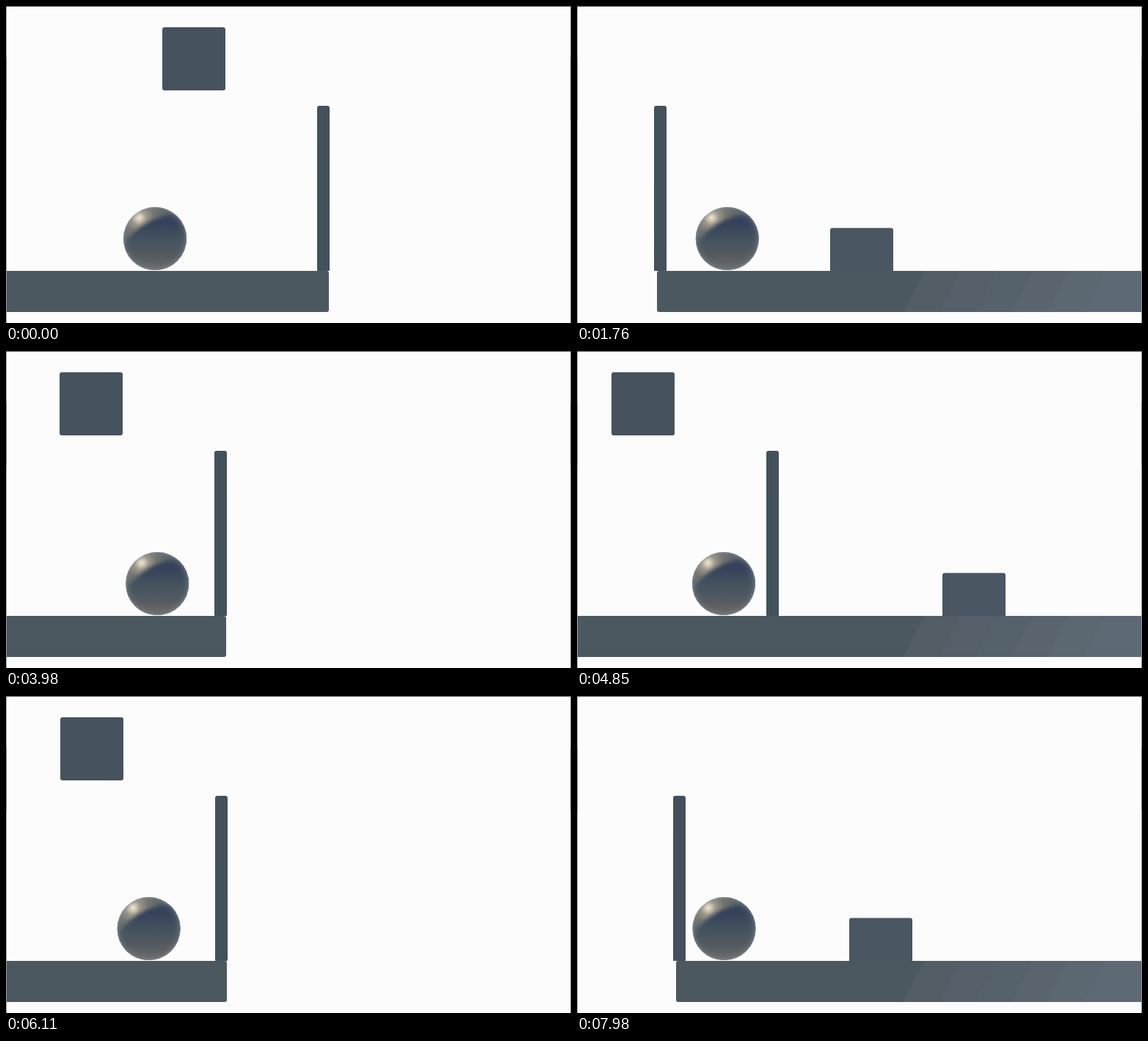
These frames come from a looping animation (770x432 px, 8 s). An HTML page with a canvas:

```html
<!DOCTYPE html>
<html lang="en">
<head>
<meta charset="utf-8">
<title>Rolling ball</title>
<style>
html, body { margin: 0; width: 100%; height: 100%; overflow: hidden; background: #fcfcfc; }
canvas { display: block; width: 100%; height: 100%; }
</style>
</head>
<body>
<canvas id="stage" width="770" height="432"></canvas>
<script>
const ctx = document.getElementById('stage').getContext('2d');
const LOOP = 8000, STEP = 10;
const FLOOR = 361, FLOOR_H = 56, SIZE = 86, RADIUS = 43;

// Key points of the wall on screen: time (ms), x
const path = [
  [500, 424], [1280, 183], [1760, 105], [2080, 86], [2920, 198], [3120, 261],
  [3560, 325], [4585, 213], [4850, 258], [5080, 290], [5780, 175], [6110, 285],
  [6260, 365], [6900, 123], [7320, 27], [7980, 131], [8400, 176]
];

const slope = i => (path[i + 1][1] - path[i][1]) / (path[i + 1][0] - path[i][0]);

// Harmonic mean of the neighbouring slopes, zero where the ball turns
function tangent(i) {
  if (i === 0 || i === path.length - 1) return 0;
  const a = slope(i - 1), b = slope(i);
  return a * b > 0 ? 2 * a * b / (a + b) : 0;
}

// Monotone cubic through the key points: position and speed (px/ms)
function motion(t) {
  if (t <= path[0][0]) return { x: path[0][1], v: 0 };
  const i = path.findIndex(p => p[0] > t) - 1;
  const [t0, x0] = path[i], d = path[i + 1][0] - t0, s = (t - t0) / d;
  const m = slope(i), a = tangent(i), b = tangent(i + 1);
  const c = 3 * m - 2 * a - b, e = a + b - 2 * m;
  return {
    x: x0 + d * s * (a + s * (c + s * e)),
    v: a + s * (2 * c + 3 * s * e)
  };
}

// A room unloads once the ball is well past the wall and loads on its return
const rooms = [];
for (let t = 0, left = true, right = false; t < LOOP; t += STEP) {
  const { x } = motion(t);
  left = left ? x > 112 : x > 145;
  right = right ? x < 279 : x < 245;
  rooms.push({ left, right });
}

function gradient(g, stops) {
  stops.forEach(([at, color]) => g.addColorStop(at, color));
  return g;
}

const wallFill = gradient(ctx.createLinearGradient(0, 136, 0, FLOOR),
  [[0, '#44515b'], [1, '#42515b']]);
const body = gradient(ctx.createLinearGradient(0, -RADIUS, 0, RADIUS), [
  [0, '#3f4a60'], [0.25, '#35415a'], [0.5, '#43525f'], [0.75, '#53595f'], [1, '#6b6b69']
]);
const shine = gradient(ctx.createRadialGradient(-22, -29, 0, -22, -29, 58), [
  [0, '#f8edd0'], [0.07, '#d8cfb8'], [0.18, '#9c978b'],
  [0.36, '#74756f'], [0.6, '#5b6468'], [1, '#4c5866']
]);
const rim = gradient(ctx.createRadialGradient(0, 0, 33, 0, 0, RADIUS), [
  [0, 'rgba(125,132,136,0)'], [0.6, 'rgba(125,132,136,.15)'], [1, 'rgba(140,150,160,.55)']
]);

function block(x, y, w, h, r, fill) {
  ctx.beginPath();
  ctx.roundRect(x, y, w, h, r);
  ctx.fillStyle = fill;
  ctx.fill();
}

function floor(from, to) {
  ctx.save();
  block(from, FLOOR, to - from, FLOOR_H, 3, '#4b5860');
  ctx.clip();
  // Slanted reflections, lighter to the right
  for (let i = 0; i < 6; i++) {
    const x = 445 + 49 * i;
    ctx.beginPath();
    ctx.moveTo(x, FLOOR + FLOOR_H);
    ctx.lineTo(x + 29, FLOOR);
    ctx.lineTo(800, FLOOR);
    ctx.lineTo(800, FLOOR + FLOOR_H);
    ctx.fillStyle = `rgb(${82 + 2.2 * i}, ${93 + 2.4 * i}, ${102 + 2.7 * i})`;
    ctx.fill();
  }
  ctx.restore();
}

function ball(x) {
  ctx.save();
  ctx.translate(x, 317);
  ctx.beginPath();
  ctx.arc(0, 0, RADIUS, 0, 7);
  ctx.clip();
  ctx.fillStyle = shine;
  ctx.fillRect(-44, -44, 88, 88);
  ctx.filter = 'blur(2.5px)';
  ctx.beginPath();
  ctx.moveTo(-44, 12);
  ctx.bezierCurveTo(-31, -12, -6, -29, 27, -34);
  ctx.lineTo(60, -20);
  ctx.lineTo(60, 60);
  ctx.lineTo(-50, 60);
  ctx.fillStyle = body;
  ctx.fill();
  ctx.filter = 'none';
  ctx.fillStyle = rim;
  ctx.fillRect(-44, -44, 88, 88);
  ctx.restore();
}

function border() {
  ctx.fillStyle = '#555';
  ctx.fillRect(0, 0, 770, 1);
  for (const x of [0, 769]) {
    ctx.fillStyle = '#999';
    ctx.fillRect(x, 1, 1, 431);
    ctx.fillStyle = '#777';
    ctx.fillRect(x, 70, 1, 86);
  }
}

function draw(t) {
  const { x, v } = motion(t), wall = Math.round(x);
  const { left, right } = rooms[Math.floor(t / STEP)];
  ctx.fillStyle = '#fcfcfc';
  ctx.fillRect(0, 0, 770, 432);
  // The camera trails the ball by 20 ms
  ball(203 - v * 20);
  if (left) block(wall - 211, 29, SIZE, SIZE, 3, '#46535f');
  if (right) block(wall + 240, 302.6, SIZE, SIZE, 3, '#4a5661');
  floor(left ? -10 : wall + 4, right ? 780 : wall + 16);
  block(wall, 136, 17, FLOOR - 136, [3, 3, 1, 1], wallFill);
  border();
}

function tick() {
  draw(performance.now() % LOOP);
  requestAnimationFrame(tick);
}
tick();
</script>
</body>
</html>
```
